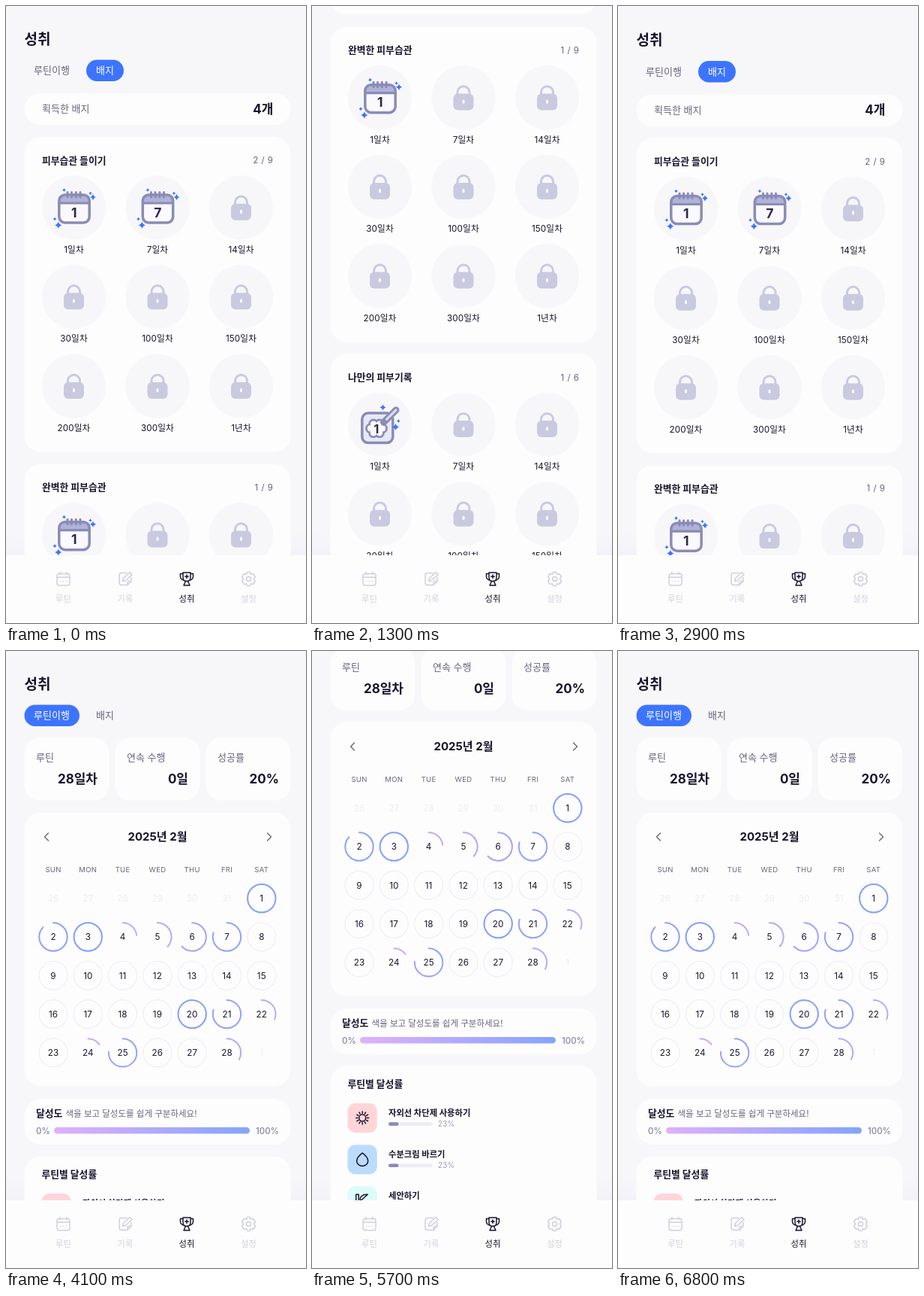
Write an HTML page that moves like this. It is 400 px wide and 820 px high and loops after 6900 ms.

```html
<!DOCTYPE html>
<html lang="ko">
<head>
<meta charset="utf-8">
<style>
  html, body { margin: 0; width: 100%; height: 100%; overflow: hidden; background: #f7f7fa; }
  svg { display: block; width: 400px; height: 820px; }
  text { font-family: Inter, "Noto Sans CJK KR", "Noto Sans CJK", sans-serif; }
  .line { fill: none; stroke-linecap: round; stroke-linejoin: round; }
</style>
</head>
<body>
<svg id="stage" viewBox="0 0 400 820" xmlns="http://www.w3.org/2000/svg"></svg>
<script>
const INK = '#17142b', GRAY = '#67657f', MUTED = '#9a9ab3', PALE = '#cfcfe0', CARD = '#fdfdfe';
const BLUE = '#3d74ff', LOCK = '#c9cadf', PURPLE = '#8a8cb6';
const COLUMNS = [90.5, 202, 313.5];

// cy is the visual middle of the line of text
const text = (x, cy, str, size, fill = INK, weight = 400, anchor = 'start', spacing = 0) =>
  `<text x="${x}" y="${cy + size * 0.37}" font-size="${size}" fill="${fill}" font-weight="${weight}"
    text-anchor="${anchor}" letter-spacing="${spacing}">${str}</text>`;
const box = (x, y, w, h, r, fill, extra = '') =>
  `<rect x="${x}" y="${y}" width="${w}" height="${h}" rx="${r}" fill="${fill}" ${extra}/>`;
const line = (d, stroke, width, extra = '') =>
  `<path class="line" d="${d}" stroke="${stroke}" stroke-width="${width}" ${extra}/>`;
const disc = (x, y, r, fill, extra = '') => `<circle cx="${x}" cy="${y}" r="${r}" fill="${fill}" ${extra}/>`;
const at = (x, y, content) => `<g transform="translate(${x} ${y})">${content}</g>`;
const card = (y, h) => box(24.5, y, 355, h, 22, CARD);

const star = (x, y, r) => {
  const c = r * 0.2;
  return at(x, y, `<path fill="${BLUE}" d="M0 ${-r}Q${c} ${-c} ${r} 0Q${c} ${c} 0 ${r}Q${-c} ${c} ${-r} 0Q${-c} ${-c} 0 ${-r}"/>`);
};

const lock = box(-13.5, -5.3, 27, 22, 6, LOCK)
  + line('M-8 -3V-7a8 8 0 0 1 16 0V-3', LOCK, 3)
  + box(-1.5, 2.8, 3, 5.2, 1.5, '#fafaff');

const calendarBadge = n => box(-19.7, -17, 40.4, 37, 8, '#f9f9fe')
  + '<path d="M-19.7 -6V-9a8 8 0 0 1 8-8h24.4a8 8 0 0 1 8 8v3z" fill="#b0b3d8"/>'
  + box(-19.7, -17, 40.4, 37, 8, 'none', `stroke="${PURPLE}" stroke-width="3.5"`)
  + line('M-19 -6H20', PURPLE, 3.2)
  + [-8.5, -3, 2.8, 8.5].map(x => line(`M${x} -20.5V-14`, PURPLE, 3)).join('')
  + text(0.3, 6.3, n, 17.5, '#2b2948', 700, 'middle')
  + star(25.5, -14, 4) + star(22, -19, 2.4) + star(-13, -23.5, 2.6) + star(-20.7, 23.3, 4.7) + star(-25.5, 15, 2.6);

function diaryBadge() {
  let blob = '';
  for (const [fill, grow] of [[PURPLE, 1.4], ['#fbfbff', -1.4]]) {
    blob += disc(-4.5, 5, 7, fill);
    for (let i = 0; i < 6; i++) {
      const a = i * Math.PI / 3;
      blob += disc(-4.5 + 8 * Math.cos(a), 5 + 6.8 * Math.sin(a), 5.5 + grow, fill);
    }
  }
  return box(-23.7, -15.3, 41, 39.5, 8, '#e7e9f9', `stroke="${PURPLE}" stroke-width="3.5"`) + blob
    + line('M5 -3L21.5 -19.5', PURPLE, 9) + line('M9 -7L21.5 -19.5', '#dcdef2', 3)
    + text(-4.7, 5.2, '1', 16.5, '#2b2948', 700, 'middle')
    + star(4, -23, 4.2) + star(21, 3, 4.7) + star(24.8, -4.8, 2.6);
}

const header = active => text(24.5, 43.7, '성취', 19, INK, 700)
  + (active ? box(107, 71.5, 50, 28.5, 14.25, BLUE) : box(24.5, 71.5, 73.5, 28.5, 14.25, BLUE))
  + text(61, 85.5, '루틴이행', 13, active ? GRAY : '#fff', 400, 'middle')
  + text(132, 85.5, '배지', 13, active ? '#fff' : GRAY, 400, 'middle');

const DAYS = ['1일차', '7일차', '14일차', '30일차', '100일차', '150일차', '200일차', '300일차', '1년차'];

function badgeCard(top, title, count, earned) {
  let out = card(top, count === 9 ? 418.7 : 300)
    + text(48, top + 31, title, 12.8, INK, 700)
    + text(356.5, top + 31, `${earned.length} / ${count}`, 11.5, GRAY, 400, 'end', 0.5);
  for (let i = 0; i < count; i++) {
    const x = COLUMNS[i % 3], y = top + 94 + 118.6 * Math.floor(i / 3);
    out += disc(x, y, 42.7, '#f7f7fa') + at(x, y, earned[i] || lock)
      + text(x, y + 55.5, DAYS[i], 11.7, INK, 400, 'middle', 0.1);
  }
  return out;
}

const badgesPage = header(true)
  + box(24.5, 116, 355, 42, 21, CARD)
  + text(48, 136.5, '획득한 배지', 13, GRAY) + text(356.5, 136.5, '4개', 17, INK, 700, 'end')
  + badgeCard(174, '피부습관 들이기', 9, [calendarBadge(1), calendarBadge(7)])
  + badgeCard(608.7, '완벽한 피부습관', 9, [calendarBadge(1)])
  + badgeCard(1043.4, '나만의 피부기록', 6, [diaryBadge()]);

const RESULTS = { 1: 100, 2: 87, 3: 100, 4: 23, 5: 37, 6: 63, 7: 80, 20: 100, 21: 80, 22: 31, 24: 15, 25: 76, 28: 33 };
const mix = p => `rgb(${[[216, 172, 248], [130, 160, 252]].reduce((a, b) => a.map((v, i) => Math.round(v + (b[i] - v) * p / 100)))})`;

function calendar() {
  let out = card(214.5, 364) + text(202, 246.5, '2025년 2월', 15, INK, 700, 'middle')
    + line('M56.5 242l-5 5 5 5', GRAY, 1.4) + line('M348.5 242l5 5-5 5', GRAY, 1.4);
  ['SUN', 'MON', 'TUE', 'WED', 'THU', 'FRI', 'SAT'].forEach((name, i) => {
    out += text(63 + 46.3 * i, 290.5, name, 9.5, GRAY, 400, 'middle', 0.3);
  });
  for (let i = 0; i < 35; i++) {
    const x = 63 + 46.3 * (i % 7), y = 328.7 + 51.3 * Math.floor(i / 7);
    const day = i - 5, inMonth = day > 0 && day < 29, result = RESULTS[day];
    const label = day < 1 ? day + 31 : inMonth ? day : day - 28;
    if (inMonth) {
      out += result
        ? `<circle class="ring line" data-p="${result}" r="18.7" pathLength="100" stroke="${mix(result)}" stroke-width="2"
            transform="translate(${x} ${y}) rotate(-90)"/>`
        : disc(x, y, 19, 'none', 'stroke="#efeff5" stroke-width="1.2"');
    }
    out += text(x, y, label, 11.7, inMonth ? INK : '#ededf3', 400, 'middle', 0.1);
  }
  return out;
}

const rays = (n, inner, outer) => Array.from({ length: n }, (_, i) => {
  const a = i * 2 * Math.PI / n - Math.PI / 2, c = Math.cos(a), s = Math.sin(a);
  return `M${inner * c} ${inner * s}L${outer * c} ${outer * s}`;
}).join('');
const snowArm = 'M0 0V-8.5M-2.4 -8L0 -5.6L2.4 -8';
const sketch = (d, width = 1.5) => line(d, INK, width);
const ring = r => disc(0, 0, r, 'none', `stroke="${INK}" stroke-width="1.5"`);
const dots = [0, 4, 8].flatMap(x => [0, 4, 8].map(y => disc(x, y, 0.9, INK))).join('');

const ROUTINES = [
  ['자외선 차단제 사용하기', 23, '#ffd5d8', ring(4.5) + sketch(rays(12, 6.2, 8.5))],
  ['수분크림 바르기', 23, '#bcdcff', sketch('M0 -8.5C4 -5.5 7.5 -1.5 7.5 2a7.5 6.8 0 0 1-15 0C-7.5 -1.5 -4 -5.5 0 -8.5z')],
  ['세안하기', 26, '#dcfbfb', sketch('M-8.5 9V-8.5H-5V9M-2.5 0C-4.5 -5 0 -9 7 -8.5z') + dots],
  ['기초제품 사용하기', 25, '#dafbd7', sketch('M-4 -6Q-2 -9 4 -9M0 -8.5V-5.5M-3 -2V-5H3V-2M-4 -2H4Q8 0 8 4.5Q8 9 4 9H-4Q-8 9 -8 4.5Q-8 0 -4 -2zM-4 2H4V5.5H-4z')],
  ['표정근육 운동하기', 25, '#efdcfc', ring(8.5) + sketch('M-5.5 -2L-2 -1M5.5 -2L2 -1M-3 4Q0 2 3 4M-5 1.5h1M4 1.5h1')],
  ['차갑게 진정 관리하기', 27, '#fde4f5', [0, 60, 120, 180, 240, 300].map(a => `<g transform="rotate(${a})">${sketch(snowArm, 1.3)}</g>`).join('')],
  ['각질 관리 제품 사용하기', 0, '#eceef6', sketch('M8.5 0A8.5 8.5 0 1 0 0 8.5Q6 6 8.5 0Q1 -1 0 8.5')],
];

const routineRow = ([name, percent, color, icon], i) => {
  const y = 740.5 + 55.15 * i;
  return box(47.5, y - 19.5, 39.3, 39.3, 10, color) + at(67.2, y, icon)
    + text(102, y - 6.5, name, 11.3, INK, 700)
    + box(102, y + 5.8, 58.5, 4.6, 2.3, '#ecedf5') + box(102, y + 5.8, 58.5 * percent / 100, 4.6, 2.3, PURPLE)
    + text(168, y + 8.2, `${percent}%`, 9.7, MUTED, 400, 'start', 0.3);
};

const summary = [['루틴', '28일차'], ['연속 수행', '0일'], ['성공률', '20%']].map(([label, value], i) => {
  const x = 24.5 + 121 * i;
  return box(x, 115.5, 113, 83, 20, CARD) + text(x + 15.5, 141, label, 13, GRAY)
    + text(x + 97.5, 170, value, 17, INK, 700, 'end');
}).join('');

const routinePage = header(false) + summary + calendar()
  + card(595, 61) + text(40, 614.5, '달성도', 12.8, INK, 700)
  + text(79.5, 614.5, '색을 보고 달성도를 쉽게 구분하세요!', 11.5, GRAY)
  + text(40, 637.3, '0%', 11.5, '#8585a0', 500) + box(64, 633, 261, 8.5, 4.25, 'url(#scale)')
  + text(364, 637.3, '100%', 11.5, '#8585a0', 500, 'end')
  + card(671.5, 434.5) + text(47.5, 695.5, '루틴별 달성률', 12.8, INK, 700)
  + ROUTINES.map(routineRow).join('');

const gear = 'M-2 -9H2L3 -6.3L6.2 -7L8.8 -3L7 0L8.8 3L6.2 7L3 6.3L2 9H-2L-3 6.3L-6.2 7L-8.8 3L-7 0L-8.8 -3L-6.2 -7L-3 -6.3z';
const NAV = [
  [76.5, '루틴', PALE, 'M-6 -7H6Q8.5 -7 8.5 -4V5Q8.5 8.5 5.5 8.5H-5.5Q-8.5 8.5 -8.5 5V-4Q-8.5 -7 -6 -7zM-8.5 -2.2H8.5M-4.5 -9V-6M4.5 -9V-6M-4 3h.1M0 3h.1M4 3h.1'],
  [159, '기록', PALE, 'M2 -8H-5Q-8 -8 -8 -5V5Q-8 8 -5 8H3L8 3V-2M8 3H5Q3 3 3 5V8M-3.5 3L-2.5 -1L6 -9L9 -6L0.5 2z'],
  [241, '성취', INK, 'M-5 -8.5H5V-2Q5 3 0 3Q-5 3 -5 -2zM-5 -7H-8.5V-3Q-8 1 -4 1.5M5 -7H8.5V-3Q8 1 4 1.5M-1.5 3L-4 8.5H4L1.5 3M0 -5.5V-1M-2.2 -3.3H2.2'],
  [323.5, '설정', PALE, gear + 'M3 0A3 3 0 1 0 -3 0A3 3 0 1 0 3 0'],
];
const nav = box(0, 730, 400, 90, 0, CARD)
  + NAV.map(([x, label, color, d]) => at(x, 761.5, line(d, color, 1.5)) + text(x, 787.5, label, 11.3, color, 400, 'middle')).join('');

const stage = document.getElementById('stage');
stage.innerHTML = `<defs>
    <linearGradient id="scale"><stop stop-color="#dfb0fb"/><stop offset="1" stop-color="#84a4fd"/></linearGradient>
    <linearGradient id="shade" x2="0" y2="1"><stop stop-color="#f0f0f8" stop-opacity="0"/><stop offset="1" stop-color="#f0f0f8" stop-opacity=".8"/></linearGradient>
  </defs>
  <rect width="400" height="820" fill="#f7f7fa"/>
  ${box(0, 700, 400, 30, 0, 'url(#shade)')}
  <g id="badges">${badgesPage}</g><g id="routine">${routinePage}</g>${nav}`;

const badges = document.getElementById('badges'), routine = document.getElementById('routine');
const rings = [...document.querySelectorAll('.ring')];

// [time in ms, scroll offset in px]; negative offsets are the bounce at the top
const SCROLL = [
  [0, 0], [700, 0], [800, 25], [900, 140], [1000, 310], [1100, 440], [1200, 525], [1300, 581], [1400, 610],
  [1500, 625], [1600, 634], [1700, 639], [1900, 642], [2000, 642], [2100, 610], [2200, 470], [2300, 312],
  [2400, 170], [2500, 60], [2600, 0], [2700, -5], [2800, -3], [3000, 0], [4700, 0], [4800, 20], [4900, 120],
  [5000, 265], [5100, 365], [5200, 406], [5300, 409], [5400, 406], [5500, 380], [5600, 250], [5700, 120],
  [5800, 25], [5900, -6], [6000, -3], [6100, -1], [6500, 0], [6900, 0],
];
const LOOP = 6900, STEP = 100, SWITCH = 3700;

function scrollAt(t) {
  const i = SCROLL.findIndex(key => key[0] > t);
  const [t0, y0] = SCROLL[i - 1], [t1, y1] = SCROLL[i];
  return y0 + (y1 - y0) * (t - t0) / (t1 - t0);
}

function draw(now) {
  const t = Math.floor(now % LOOP / STEP) * STEP;
  const onRoutine = t >= SWITCH;
  badges.style.display = onRoutine ? 'none' : '';
  routine.style.display = onRoutine ? '' : 'none';
  (onRoutine ? routine : badges).setAttribute('transform', `translate(0 ${-scrollAt(t)})`);

  const left = 1 - Math.min(1, Math.max(0, (t - SWITCH + STEP) / 500));
  const grown = 1 - left ** 3;
  for (const el of rings) el.setAttribute('stroke-dasharray', `${el.dataset.p * grown} 200`);
}

const start = performance.now();
function frame() {
  draw(performance.now() - start);
  requestAnimationFrame(frame);
}
frame();
</script>
</body>
</html>
```
